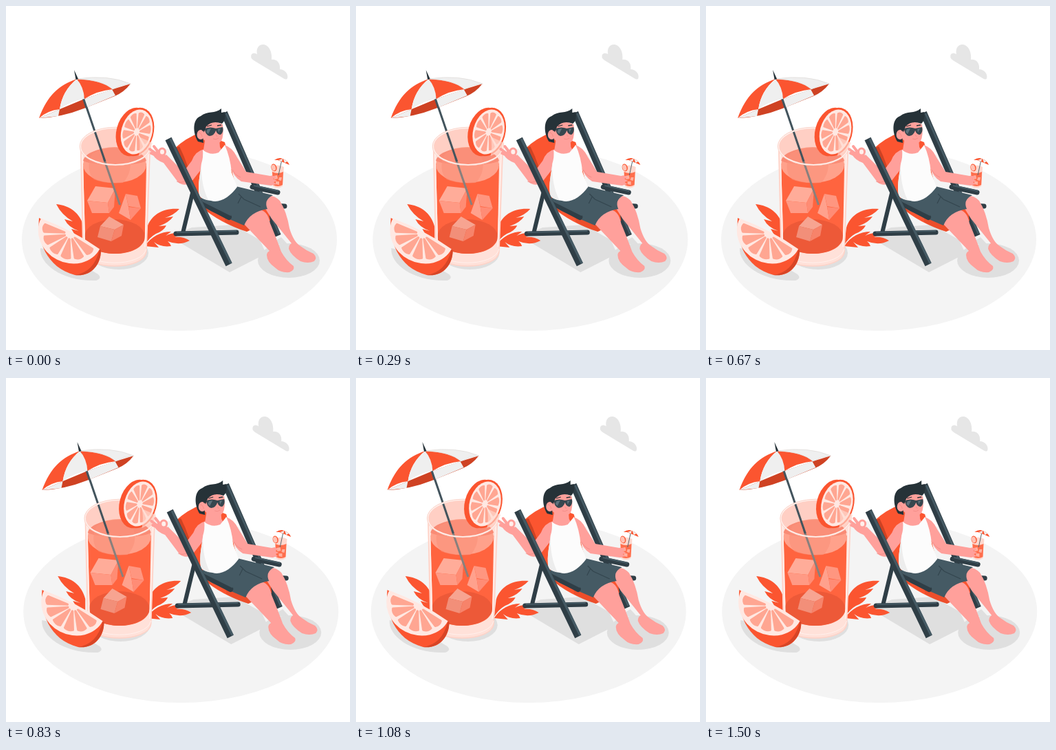
An HTML page that plays this animation: 500x500 px, repeating every 1.54 s.

```html
<!DOCTYPE html>
<html lang="en">
<head>
<meta charset="utf-8">
<title>Summer drink</title>
<style>
html, body { margin: 0; width: 100%; height: 100%; overflow: hidden; background: #fff; }
svg { display: block; width: 100vw; height: 100vh; }
.o { fill: #fb5530; }
.od { fill: #cf4223; }
.d { fill: #263238; }
.g { fill: #455a64; }
.s { fill: #ffa09b; }
.w { fill: #efefef; }
.sh { fill: #dfdfdf; }
.bar { stroke: #2f3e46; fill: none; }
.hi { stroke: #455a64; fill: none; }
.line { fill: none; stroke: #ee8680; stroke-width: .7; }
.seg { fill: #ffa692; stroke: #ffa692; stroke-linejoin: round; }
</style>
</head>
<body>
<svg viewBox="0 0 500 500">
<!-- data-k: how strongly a layer follows the shake -->
<g data-k="1">
  <ellipse cx="252" cy="339.5" rx="229" ry="132.5" fill="#f4f4f4"/>
  <path fill="#e6e6e6" d="M357 70Q360 67 365 70C363 61 368 55 375 56C383 58 387 67 386 78C393 77 399 82 398 92C405 92 411 99 409 105Q408 108 403 105L360 79Q354 75 357 70Z"/>
  <path class="sh" d="M238 335L325 387L378 360L369 340L330 318L270 322ZM384 346L409 346L400 336Z"/>
  <ellipse class="sh" cx="411" cy="370" rx="45" ry="25"/>
  <ellipse class="sh" cx="164" cy="359" rx="43" ry="24"/>
  <path class="sh" d="M50 352C48 376 84 401 131 399Q140 396 134 390L80 358Z"/>
  <path class="o" d="M73 288C93 290 108 301 113 321V342Q102 338 95 324L106 327Q91 322 85 310L97 313Q81 304 73 288Z"/>
  <path class="o" d="M252 295C229 293 211 303 205 322L202 347Q209 336 218 331Q229 327 233 319L222 320Q237 315 243 306L231 308Q244 304 252 295Z"/>
  <path class="o" d="M202 349C211 335 225 328 240 328L232 334Q243 328 256 331L245 336Q258 335 267 341Q252 349 235 342Q239 345 240 349Q225 351 215 343L222 351Z"/>
</g>

<g data-k="3">
  <path fill="#ffe1d9" d="M108 204L112 357C114 385 202 385 204 357L210 204Z"/>
  <ellipse cx="159" cy="204" rx="51" ry="27" fill="#ffcfc4"/>
  <path fill="#ff643f" d="M112 229L115 336C118 368 199 368 202 336L204 229Z"/>
  <ellipse cx="158" cy="335" rx="44" ry="25" fill="#ed5938"/>
  <ellipse cx="158" cy="231" rx="46" ry="26" fill="#ffa18b"/>
  <path fill="#f98b75" d="M112 225C118 200 198 200 204 225Q192 231 159 231Q126 231 112 225Z"/>
  <path fill="#fb927b" d="M128 252C119 244 118 229 125 215Q148 202 171 207C184 222 184 242 170 257Q144 259 128 252Z" opacity=".65"/>
</g>

<g data-k="2">
  <path fill="#ffac99" d="M118 283L130 262L159 265L148 286Z"/>
  <path fill="#ff9a85" d="M118 283L148 286L150 301L125 301Z"/>
  <path fill="#ff8c74" d="M148 286L159 265L157 292L150 301Z"/>
  <path fill="#ff9680" d="M174 273L191 276L196 294L178 291Z"/>
  <path fill="#ffa18d" d="M174 273L178 292L181 311L164 301Z"/>
  <path fill="#ff8c76" d="M178 292L196 294L181 311Z"/>
  <path fill="#f7a491" d="M150 306L171 318L158 325L137 320Z"/>
  <path fill="#f28f79" d="M137 320L158 325L153 342L133 336Z"/>
  <path fill="#f7836a" d="M171 318L168 334L153 342L158 325Z"/>
  <path d="M142 221L165.500 289" fill="none" stroke="#88807d" stroke-width="3"/>
  <path d="M103 106L144 226" fill="none" stroke="#43545d" stroke-width="3"/>
  <path class="od" d="M48 163L78 150L114 135L155 121L181 113Q172 125 158 131L113 149Q80 162 48 163Z"/>
  <path class="w" d="M48 163L78 150L76 160ZM114 135L154 121L159 130L116 148Z"/>
  <path d="M112 133L117 148" stroke="#43545d" stroke-width="3"/>
  <path class="o" d="M103 106C77 115 60 130 48 163Q60 152 78 150Q82 123 103 106Z"/>
  <path class="w" d="M103 106Q82 123 78 150Q94 138 114 135Q113 118 103 106Z"/>
  <path class="o" d="M103 106Q113 118 114 135Q133 123 155 121Q140 108 103 106Z"/>
  <path class="w" stroke="#d8d3d1" stroke-width=".6" d="M103 106Q140 107 155 121Q167 114 181 113Q148 99 103 106Z"/>
  <path class="d" d="M99 93L105 106L101.500 107Z"/>
</g>

<g data-k="3" fill="none">
  <path d="M108.500 204L112 357C114 385 202 385 204 357L209.500 204" stroke="#ffd3c8" stroke-width="1.500"/>
  <path d="M111 215L114.500 350M207 215L202 350" stroke="#fff0ec" stroke-width="1.500"/>
  <path d="M112 353C118 380 198 380 204 353" stroke="#fff1ed" stroke-width="1"/>
  <ellipse cx="159" cy="204" rx="51" ry="27" stroke="#fff3ef" stroke-width="2.200"/>
  <ellipse cx="159" cy="204" rx="51.800" ry="27.800" stroke="#f6b9aa" stroke-width=".6"/>
</g>

<g data-k="2">
  <g transform="translate(185 183) rotate(15) scale(.68 1)"><circle r="36" class="o"/></g>
  <g transform="translate(190 183) rotate(15) scale(.68 1)">
    <circle r="36" class="o"/><circle r="33" fill="#ffe8e2"/>
    <path id="disc" class="seg" stroke-width="3"/>
  </g>
  <path fill="#ffd8ce" opacity=".65" d="M193 190L213 199Q207 213 193 218Q196 203 193 190Z"/>
  <path class="o" d="M48 308C45 340 58 380 100 391C122 394 138 378 138 355Z"/>
  <path class="od" d="M136 354L138 355C138 377 122 394 100 391Q128 387 136 354Z" opacity=".8"/>
  <g transform="translate(93.500 331) rotate(27.500) scale(1 .88)">
    <path fill="#ffe8e2" d="M-48 0A48 48 0 0 0 48 0Q0 -7 -48 0Z"/>
    <path id="half" class="seg" stroke="#f58e78" stroke-width="3.500"/>
  </g>
</g>

<g data-k="1">
  <path class="bar" stroke-width="6" d="M272 268L257 330"/>
  <path class="bar" stroke-width="10" d="M317 155L395 334"/>
  <path class="hi" stroke-width="3" d="M320 156L397 331"/>
  <path class="bar" stroke-width="7" stroke-linecap="round" d="M247 331L335 329M358 263L395 271M372 289L405 291"/>
  <path class="hi" stroke-width="2" d="M248 329L335 327M360 261L396 269"/>
  <path class="o" d="M245 207Q261 192 282 184L318 198L335 266L380 285L384 312L350 328Q310 315 284 292Q268 275 262 243Z"/>
  <path class="od" d="M245 207L252 204Q266 232 270 258Q278 284 298 301L284 292Q268 275 262 243Z"/>
  <path class="od" d="M318 306L344 316L384 308V312L350 328Q332 322 318 314Z" opacity=".35"/>

  <path class="s" d="M369 282Q384 269 398 283Q408 299 412 323Q418 343 428 349Q437 356 447 360Q453 366 448 371Q439 375 428 371Q414 362 411 353Q411 347 415 345L386 309Z"/>
  <path class="s" d="M346 317Q343 303 361 296Q380 293 384 316Q394 340 400 357Q407 370 418 378Q420 384 412 387Q399 388 392 381Q379 372 379 362Q379 358 383 356Z"/>
  <path class="g" d="M284 276L300 282Q320 277 334 262L388 275Q374 282 380 295Q354 299 346 319L302 300Q281 291 284 276Z"/>
  <path d="M338 273L346 281L370 292M342 277L337 287" fill="none" stroke="#33454e" stroke-width="1.200"/>

  <path class="s" d="M317 202Q329 205 336 220L349 241L384 247L393 245L396 256L385 261L342 255Q331 249 325 231Z"/>
  <path class="s" d="M288 208Q275 211 270 225L258 241L233 216L226 224L250 256Q260 264 270 255L288 232Z"/>
  <path class="s" d="M290 190L310 193L311 205Q316 211 308 216Q295 221 287 209Z"/>
  <path fill="#fcfcfc" d="M286 209Q297 218 309 213L318 202Q326 220 328 242L336 263C326 277 311 287 298 283Q287 282 281 276C278 257 283 243 284 229Q287 220 286 209Z"/>
  <path fill="#ededed" d="M284 229Q283 260 294 282Q285 281 281 276C278 257 283 243 284 229Z"/>

  <path class="s" d="M287 176Q300 164 315 172Q317 188 313 196Q306 204 294 200L286 193Z"/>
  <path class="d" d="M279 197C271 184 271 164 283 160C293 152 304 157 313 149L313 155L318 154Q320 166 314 171C304 167 297 169 291 175L286 188L287 199Z"/>
  <ellipse class="s" cx="283" cy="187" rx="5.500" ry="7"/>
  <path class="line" d="M280 184Q284 184 285 190M301 193Q305 195 309 192M305 187L307 190"/>
  <path d="M292 175L299 173M307 174L313 173" stroke="#263238" stroke-width="1.300"/>
  <path d="M285 181L291 179" stroke="#263238" stroke-width="1.500"/>
  <path fill="#37474f" d="M289 178Q297 175 305 178L315 176Q317 183 312 187Q307 187 305 181Q303 188 296 189Q289 187 289 178Z"/>
  <path fill="#5d717b" d="M293 179L298 178L294 186L291 183ZM308 179L312 178L309 184Z"/>

  <path fill="none" stroke="#ffa09b" stroke-width="4" stroke-linecap="round" d="M228 222L209 208M225 220L211 214M229 222L215 204"/>
  <path class="s" d="M218 211L230 215L235 220L229 228Q218 224 214 217Z"/>
  <ellipse cx="227" cy="212" rx="4.500" ry="5" fill="#fff0ec" stroke="#ffa09b" stroke-width="3"/>
  <path class="line" d="M248 255Q255 258 261 254M329 238Q333 246 341 249"/>

  <path class="bar" stroke-width="8" stroke-linecap="round" d="M280 284L324 307"/>
  <path class="hi" stroke-width="2.500" d="M281 281L327 304"/>
  <path class="bar" stroke-width="10" d="M236 193L324 376"/>
  <path class="hi" stroke-width="3.500" d="M239 193L327 374"/>
</g>

<g data-k="2">
  <path fill="#ffd8ce" d="M386 234Q395 229 404 234L402 262Q395 267 388 262Z"/>
  <path fill="#ff6e4c" d="M387 241Q395 245 403 241L402 260Q395 264 388 260Z"/>
  <path fill="#ffb1a0" d="M389 247L394 246L395 251L390 252ZM397 249L401 249L400 254L396 253ZM392 255L397 255L397 260L392 259Z"/>
</g>
<g data-k="1">
  <path d="M401 223L396 246" fill="none" stroke="#55656d" stroke-width="1"/>
  <path class="o" d="M390 224Q397 219 402 222Q409 224 412 231L405 228L400 226L395 224Z"/>
  <path class="w" d="M402 222L396 224L401 226ZM403 222L405 228L409 226Z"/>
  <ellipse cx="389.500" cy="235" rx="4" ry="5.500" class="o" transform="rotate(-15 389 235)"/>
  <ellipse cx="389" cy="235" rx="3" ry="4.500" fill="#ffc2b4" transform="rotate(-15 389 235)"/>
  <path class="s" d="M384 247L391 247L393 250L388 251L394 254L389 256L393 259L385 261Z"/>
</g>
</svg>
<script>
const LOOP = 1540, STEPS = 37, SHAKE = 1500, LEAD = 0.02;
const stops = [0, -1, 2, -4, 4, -4, 4, -4, 2, -1, 0];
const layers = [...document.querySelectorAll("[data-k]")];

// Citrus wedges between two angles, each a rounded triangle with a bowed edge
function wedges(id, n, from, to, inner, outer, gap) {
  const at = (r, a) => (r * Math.cos(a)).toFixed(1) + " " + (r * Math.sin(a)).toFixed(1);
  const size = (to - from) / n;
  let d = "";
  for (let i = 0; i < n; i++) {
    const a = from + i * size + gap, b = from + (i + 1) * size - gap, m = (a + b) / 2;
    d += `M${at(inner, m)}L${at(outer, a)}Q${at(outer * 1.08, m)} ${at(outer, b)}Z`;
  }
  document.getElementById(id).setAttribute("d", d);
}

function shake(p) {
  const x = Math.min(p, 1) * 10, i = Math.min(Math.floor(x), 9);
  return stops[i] + (stops[i + 1] - stops[i]) * (x - i);
}

function draw(ms) {
  const step = Math.min(STEPS - 1, Math.floor((ms % LOOP + 5) * STEPS / LOOP));
  const dx = shake(LEAD + step / 24 * 1000 / SHAKE) - shake(LEAD);
  for (const el of layers) {
    el.setAttribute("transform", `translate(${(dx * el.dataset.k).toFixed(2)} 0)`);
  }
}

wedges("disc", 10, 0, Math.PI * 2, 7, 27, 0.13);
wedges("half", 6, 0.04, Math.PI - 0.04, 9, 39, 0.1);

const start = performance.now();
function tick() {
  draw(performance.now() - start);
  requestAnimationFrame(tick);
}
draw(0);
requestAnimationFrame(tick);
</script>
</body>
</html>
```
